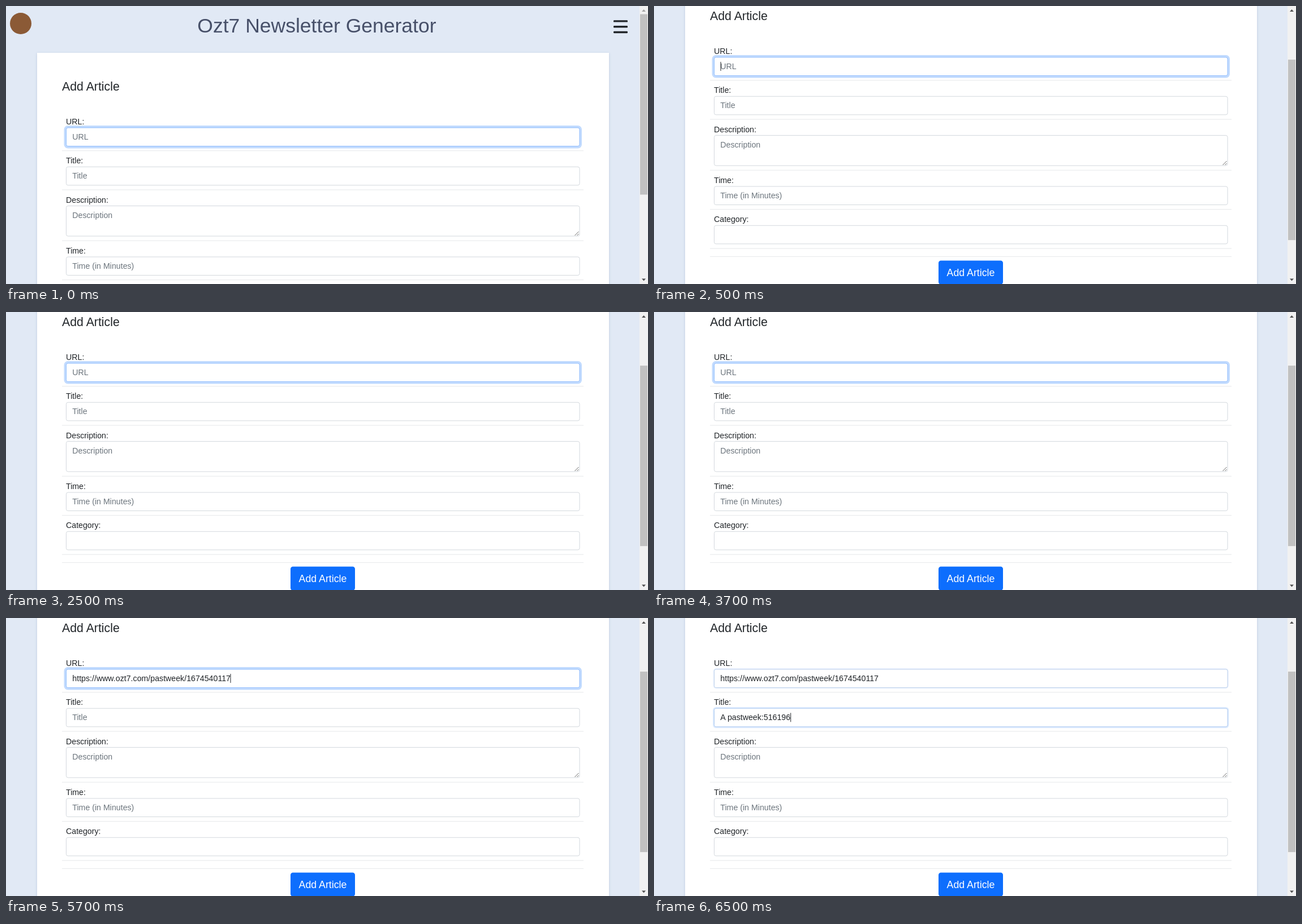
Animation, 1135 px wide and 493 px high, one loop 8 s. Source, as an HTML page:

```html
<!DOCTYPE html>
<html lang="en">
<head>
<meta charset="utf-8">
<title>Newsletter form</title>
<style>
  html, body { margin: 0; width: 100%; height: 100%; overflow: hidden; background: #e1e9f5; }
  svg { display: block; width: 1135px; height: 493px; font: 14.2px "Liberation Sans", Arial, sans-serif; fill: #212529; }
  .card { fill: #fff; filter: drop-shadow(0 1px 2px rgba(30, 70, 130, .18)); }
  .rule { fill: #e6e8ea; }
  .hint { fill: #6c757d; }
  .grip { stroke: #555; stroke-width: .9; }
</style>
</head>
<body>
<svg id="stage" viewBox="0 0 1135 493"></svg>
<script>
const LOOP = 8000;
const link = "https://www.ozt7.com/pastweek/1674540117";

// focus: ring strength per field; caret: [field, x]
const steps = [
  { at: 0, scroll: 0, focus: [1], values: [] },
  { at: 500, scroll: 125, focus: [1], values: [], caret: [0, 118] },
  { at: 2500, scroll: 125, focus: [1], values: [] },
  { at: 4500, scroll: 125, focus: [1], values: [link], caret: [0, 397] },
  { at: 6500, scroll: 125, focus: [.35, .55], values: [link, "A pastweek:516196"], caret: [1, 241.7] }
];

const fields = [
  { name: "URL", y: 215.5, h: 33.5 },
  { name: "Title", y: 284.8, h: 33.5 },
  { name: "Description", y: 354, h: 54.5, grip: true },
  { name: "Time", hint: "Time (in Minutes)", y: 444.5, h: 33.5 },
  { name: "Category", hint: "", y: 513.8, h: 33.5 }
];

const rect = (x, y, w, h, attrs = "") =>
  `<rect x="${x}" y="${y}" width="${w}" height="${h}" ${attrs}/>`;
const text = (x, y, s, attrs = "") => `<text x="${x}" y="${y}" ${attrs}>${s}</text>`;
const rule = y => rect(99, y, 922, 1, 'class="rule"');
const mix = (a, b, k) => `rgb(${a.map((v, i) => Math.round(v + (b[i] - v) * k))})`;

function field({ name, hint = name, y, h, grip }, focus = 0, value) {
  const ring = 3.5 * focus;
  const border = mix([206, 212, 218], [134, 183, 254], focus);
  return text(106, y - 5.5, name + ":") +
    (focus ? rect(106 - ring, y - ring, 908.5 + 2 * ring, h + 2 * ring,
      `rx="${3.5 + ring}" fill="${mix([255, 255, 255], [194, 219, 254], focus)}"`) : "") +
    rect(106.45, y + .45, 907.6, h - .9, `rx="3.2" fill="#fff" stroke="${border}" stroke-width=".9"`) +
    text(117.3, y + 21.5, value || hint, value ? "" : 'class="hint"') +
    (grip ? `<path class="grip" d="M1005.5 ${y + h - 1.5}l7-7m-3 7l3-3"/>` : "") +
    rule(y + h + 7.2);
}

function scrollbar(scroll) {
  const up = scroll ? "#505050" : "#a3a3a3";
  return rect(1120, 0, 15, 493, 'fill="#f1f1f1"') +
    rect(1121, 14.5 + scroll * .645, 13, 320, 'fill="#c1c1c1"') +
    `<path d="M1124 10h7l-3.5-4z" fill="${up}"/><path d="M1124 483.5h7l-3.5 4z" fill="#505050"/>`;
}

function page({ scroll, focus, values, caret }) {
  return `<g transform="translate(0 ${-scroll})">` +
    '<circle cx="26" cy="31" r="19" fill="#8b5a36"/>' +
    text(338.3, 47, "Ozt7 Newsletter Generator", 'font-size="35.5" fill="#475069"') +
    [25.2, 35, 44.8].map(y => rect(1074, y, 25, 3.4, 'rx="1.2"')).join("") +
    rect(55, 83, 1011, 620, 'class="card"') +
    text(99, 150, "Add Article", 'font-size="21.3"') +
    fields.map((f, i) => field(f, focus[i], values[i])).join("") +
    rule(568.8) +
    rect(503, 576.5, 114, 42.3, 'rx="4.2" fill="#0d6efd"') +
    text(560, 604, "Add Article", 'font-size="17.74" fill="#fff" text-anchor="middle"') +
    (caret ? rect(caret[1] - .5, fields[caret[0]].y + 8.5, 1, 16) : "") +
    "</g>" + scrollbar(scroll);
}

const stage = document.getElementById("stage");
let shown;
function tick() {
  const t = performance.now() % LOOP;
  const step = steps.findLast(s => t >= s.at);
  if (step !== shown) stage.innerHTML = page(shown = step);
  requestAnimationFrame(tick);
}
tick();
</script>
</body>
</html>
```
